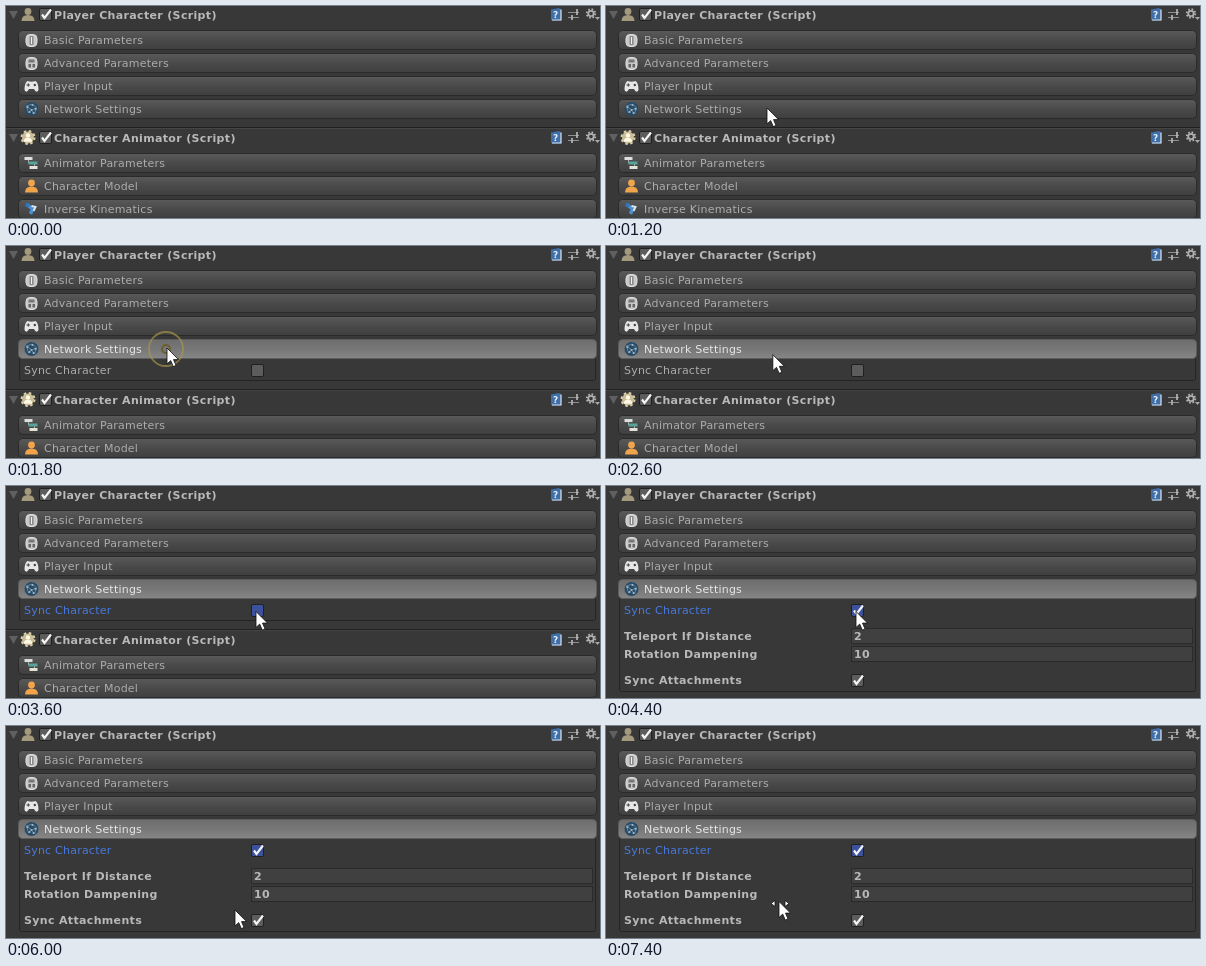
Recreate the animation shown at these times as an HTML page. Size 594 by 212 pixels, loop 7800 ms.

```html
<!DOCTYPE html>
<html lang="en">
<head>
<meta charset="utf-8">
<title>Inspector</title>
<style>
html, body { margin: 0; width: 100%; height: 100%; overflow: hidden; background: #383838; }
svg { display: block; width: 594px; height: 212px; }
text { font: 11px "DejaVu Sans", Verdana, sans-serif; letter-spacing: .22px; fill: #adadad; }
text.bold { font-weight: bold; letter-spacing: .34px; fill: #b9b9b9; }
</style>
</head>
<body>
<svg id="stage" viewBox="0 0 594 212"></svg>
<script>
const LOOP = 7800, STEP = 200;
const OPEN_AT = 1600, FOCUS_AT = 3600, CHECK_AT = 3800;

const text = (x, y, label, cls = '', extra = '') =>
  `<text x="${x}" y="${y}" class="${cls}" ${extra}>${label}</text>`;
const rect = (x, y, w, h, fill, extra = '') =>
  `<rect x="${x}" y="${y}" width="${w}" height="${h}" fill="${fill}" ${extra}/>`;
const circle = (x, y, r, fill, extra = '') =>
  `<circle cx="${x}" cy="${y}" r="${r}" fill="${fill}" ${extra}/>`;
const path = (d, fill, extra = '') => `<path d="${d}" fill="${fill}" ${extra}/>`;
const group = (x, y, content, id = '') =>
  `<g id="${id}" transform="translate(${x} ${y})">${content}</g>`;
const line = (d, color, width = 1) =>
  path(d, 'none', `stroke="${color}" stroke-width="${width}"`);

const tick = (id = '') =>
  path('M-3.5 0L-1 3.5L5.5 -5', 'none', `id="${id}" stroke="#f4f4f4" stroke-width="2.2"`);
const checkbox = (x, y, mark, id = '') => group(x, y,
  rect(-6, -6, 12, 12, '#5c5c5c', `id="${id}" rx="1.5" stroke="#202020"`) + mark);

// Icons are drawn around their own centre.
const bust = color => circle(0, -3, 3.4, color) + path('M-6.5 6.5Q-6.5 .5 0 .5T6.5 6.5Z', color);
const gear = (r, color) => circle(0, 0, r, 'none',
  `stroke="${color}" stroke-width="2" stroke-dasharray="${r * Math.PI / 8}"`);
const capsule = rect(-5.5, -5.5, 11, 12, '#c9c9c9', 'rx="4" stroke="#dedede"');
const icons = {
  capsule: capsule + rect(-2, -4, 4, 9, '#8a8a8a', 'rx="1"') + rect(-.5, -3, 1, 7, '#f0f0f0'),
  capsulePlus: capsule + rect(-3, -3.5, 6, 3, '#777') + rect(-3, 1, 2.5, 3.5, '#666') +
    rect(1, 1, 2.5, 3.5, '#666'),
  gamepad: path('M-4 -5Q0 -3.5 4 -5Q7 -3 7 4Q5 8 2.5 3H-2.5Q-5 8 -7 4Q-7 -3 -4 -5Z', '#e8e8e8') +
    line('M-5 -1H-1.5M-3.2 -2.7V.7', '#444') + circle(3.3, -1, 1.2, '#444'),
  globe: circle(0, 0, 7, '#274a66') +
    line('M-5 -3L1 -5L5 -1L0 1L-5 -3L-3 4L0 1L3 5L5 -1', '#7695aa', .8) +
    [[-4, -2], [1, -4], [4, 0], [-2, 3], [2, 4], [0, 1]].map(p => circle(...p, 1, '#a4b8c6')).join(''),
  states: line('M-3 -3V0H3V4', '#aaa') + rect(-7, -6, 8, 3, '#dedede') +
    rect(-3, -1.5, 9, 3, '#59a39b') + rect(-2, 3, 8, 3, '#e2e2d8'),
  model: bust('#f0a44c'),
  limb: line('M-4 -4L1 0L-1 5', '#4c8fd0', 3.5) + line('M0 -3L4 -2L2 2', '#d8e4ee', 2) +
    circle(-4, -4, 2.2, '#3474b8'),
  player: bust('#a39a7e'),
  animator: circle(0, 0, 6, '#c9bd95') + gear(6.5, '#d8ceaa') +
    `<g transform="scale(.65)">${bust('#fff8e6')}</g>`
};

const headerTools =
  group(550, 8.5, path('M-5 -5L3 -6.5L5 -5V6H-4L-5 5Z', '#3f6ea8') +
    line('M-4 5.5H5V-5', '#dce6f0', 1.2) +
    text(-3, 3, '?', 'bold', 'style="font-size:9px;fill:#e4eef8"')) +
  group(568, 9, line('M-6 -2.5H5M-6 2.5H5', '#8f8f8f') + line('M3 -6V0M-2 0V5', '#bcbcbc', 1.6)) +
  group(585, 7.5, circle(0, 0, 2.7, 'none', 'stroke="#b0b0b0" stroke-width="1.8"') +
    gear(4.2, '#b0b0b0') + path('M4 3.5H9L6.5 6.5Z', '#aaa'));

const header = (title, icon) =>
  path('M3 5H12L7.5 13Z', '#606060') + group(22, 8.5, icons[icon]) +
  checkbox(39.5, 8.5, tick()) + text(48, 13, title, 'bold') + headerTools;

const bar = (y, label, icon, id = '') =>
  rect(12.5, y - 9.5, 578, 19, 'url(#closed)', `id="${id}" rx="4" stroke="#2a2a2a"`) +
  group(25.5, y, icons[icon]) + text(38, y + 4, label, '', id && `id="${id}Label"`);

const field = (y, label, value) => text(18, y + 4, label, 'bold') +
  rect(245.5, y - 7.5, 341, 15, '#404040', 'stroke="#2a2a2a"') + text(248, y + 4, value, 'bold');

const gradient = (id, top, middle, bottom) =>
  `<linearGradient id="${id}" x2="0" y2="1"><stop stop-color="${top}"/>
  <stop offset=".5" stop-color="${middle}"/><stop offset="1" stop-color="${bottom}"/></linearGradient>`;

const stage = document.getElementById('stage');
stage.innerHTML =
  `<defs>${gradient('closed', '#5a5a5a', '#4a4a4a', '#3f3f3f')}
  ${gradient('opened', '#6e6e6e', '#777777', '#868686')}</defs>` +
  rect(0, 0, 594, 212, '#383838') +
  header('Player Character (Script)', 'player') +
  group(0, 0,
    rect(13.5, 109.5, 576, 25, '#383838', 'id="panel" stroke="#242424" rx="2"') +
    text(18, 128, 'Sync Character', '', 'id="syncLabel"') +
    checkbox(251.5, 124.5, tick('syncTick'), 'syncBox') +
    group(0, 0, field(150, 'Teleport If Distance', '2') + field(168, 'Rotation Dampening', '10') +
      text(18, 198, 'Sync Attachments', 'bold') + checkbox(251.5, 194.5, tick()), 'details'), 'settings') +
  bar(34, 'Basic Parameters', 'capsule') +
  bar(57, 'Advanced Parameters', 'capsulePlus') +
  bar(80, 'Player Input', 'gamepad') +
  bar(103, 'Network Settings', 'globe', 'network') +
  group(0, 0,
    rect(0, 121, 594, 1, '#1f1f1f') + rect(0, 122, 594, 1, '#454545') +
    group(0, 123, header('Character Animator (Script)', 'animator') +
      bar(34, 'Animator Parameters', 'states') +
      bar(57, 'Character Model', 'model') +
      bar(80, 'Inverse Kinematics', 'limb')), 'second') +
  circle(0, 0, 17, 'none', 'id="ring" stroke="#a8964a" stroke-width="1.8"') +
  circle(0, 0, 4, 'none', 'id="ringCore" stroke="#6b6030" stroke-width="2"') +
  group(0, 0,
    group(0, 2, path('M-8 0L-4 -3V3ZM10 0L6 -3V3Z', '#fff', 'stroke="#111" stroke-width=".8"'), 'dragArrows') +
    path('M0 0V16L3.7 12.6L6.3 18.6L9 17.4L6.5 11.6H11.5Z', '#fff', 'stroke="#111" stroke-width=".8"'), 'cursor');

const el = id => document.getElementById(id);
const show = (id, visible) => el(id).setAttribute('visibility', visible ? 'inherit' : 'hidden');
const set = (id, name, value) => el(id).setAttribute(name, value);
const tint = (id, color) => { el(id).style.fill = color; };

// Cursor moves: start time, end time, then start, control and end points.
const moves = [
  [200, 1200, [250, 212], [205, 130], [161, 102]],
  [2400, 3600, [161, 102], [200, 150], [250, 125.5]],
  [4800, 6000, [250, 125.5], [197, 150], [229, 184]],
  [6000, 7200, [229, 184], [200, 193], [173, 175.5]]
];

function cursorAt(t) {
  const [from, to, a, b, c] = moves.findLast(m => t >= m[0]) || moves[0];
  const u = Math.min(1, Math.max(0, (t - from) / (to - from)));
  const s = u * u * (3 - 2 * u);
  return a.map((p, i) => (1 - s) ** 2 * p + 2 * s * (1 - s) * b[i] + s * s * c[i]);
}

function drawRing(t, x, y) {
  const age = t - (t < CHECK_AT ? OPEN_AT : CHECK_AT);
  const visible = age >= 0 && age < 600;
  show('ring', visible);
  show('ringCore', visible && age < 400);
  for (const id of ['ring', 'ringCore']) {
    set(id, 'cx', x - 1);
    set(id, 'cy', y + 1);
  }
  set('ring', 'r', 10 + age * .035);
  set('ring', 'opacity', Math.max(0, 1 - age / 600));
}

function draw(t) {
  const open = t >= OPEN_AT, focused = t >= FOCUS_AT, checked = t >= CHECK_AT;
  show('settings', open);
  show('details', checked);
  show('syncTick', checked);
  set('panel', 'height', checked ? 96 : 25);
  set('second', 'transform', `translate(0 ${checked ? 93 : open ? 22 : 0})`);
  set('network', 'fill', open ? 'url(#opened)' : 'url(#closed)');
  set('network', 'stroke', open ? '#5c5c5c' : '#2a2a2a');
  tint('networkLabel', open ? '#e6e6e6' : '#adadad');
  tint('syncLabel', focused ? '#4679e0' : '#adadad');
  set('syncBox', 'fill', focused ? '#3c529c' : '#5c5c5c');

  const [x, y] = cursorAt(t);
  show('cursor', t >= 400);
  set('cursor', 'transform', `translate(${x} ${y})`);
  show('dragArrows', checked && x < 243 && y > 141 && y < 177);
  drawRing(t, x, y);
}

function frame() {
  const t = performance.now() % LOOP;
  draw(Math.floor(t / STEP) * STEP);
  requestAnimationFrame(frame);
}
frame();
</script>
</body>
</html>
```
